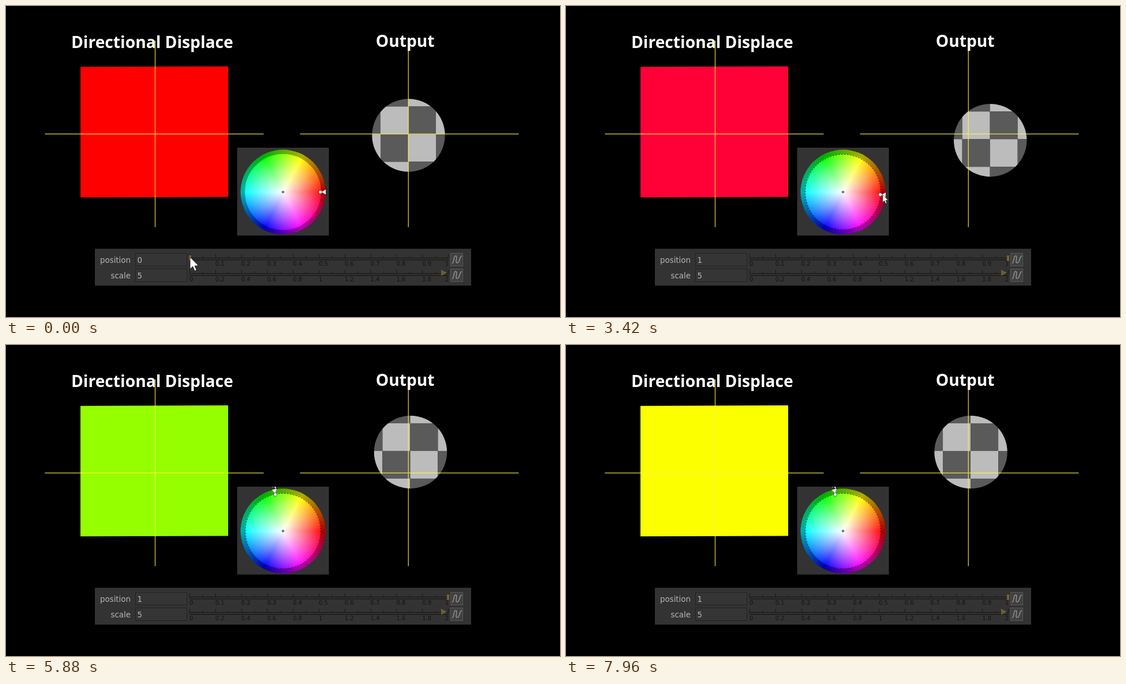
An HTML page with a canvas that plays this animation: 960x540 px, repeating every 8000 ms.

```html
<!DOCTYPE html>
<html lang="en">
<head>
<meta charset="utf-8">
<title>Directional Displace</title>
<style>
html, body { margin: 0; width: 100%; height: 100%; overflow: hidden; background: #000; }
canvas { display: block; }
</style>
</head>
<body>
<canvas id="stage" width="960" height="540"></canvas>
<script>
const ctx = document.getElementById('stage').getContext('2d');
const LOOP = 8000, DRAG_START = 2960, TAU = Math.PI * 2, RAD = Math.PI / 180;
const MAX_REACH = 38.7;
const wheel = { x: 480, y: 323, r: 73.5, inner: 66 };
const wheelPanel = [400.5, 246, 159, 152.5];
const sliderPanel = [154, 421.5, 652, 64];

// Poses of the wheel drag: time, handle angle, displacement angle (counter-clockwise degrees).
const drag = [
  { at: DRAG_START, dial: 0, push: 0 },
  { at: 3420, dial: -4, push: -13 },
  { at: 4250, dial: -63, push: -60 },
  { at: 5000, dial: -124, push: -118 },
  { at: 5880, dial: -258, push: -275 },
  { at: 6710, dial: -350, push: -333 },
  { at: 6990, dial: -395, push: -395 },
  { at: 7960, dial: -258, push: -276 },
];

const ramp = (t, from, to) => Math.min(1, Math.max(0, (t - from) / (to - from)));

// Smooth interpolation between poses that never overshoots and rests at both ends.
function pose(key, t) {
  const last = drag.length - 1;
  if (t <= drag[0].at) return drag[0][key];
  if (t >= drag[last].at) return drag[last][key];
  const grade = i => (drag[i + 1][key] - drag[i][key]) / (drag[i + 1].at - drag[i].at);
  const slope = i => {
    if (i === 0 || i === last) return 0;
    const a = grade(i - 1), b = grade(i);
    return a * b <= 0 ? 0 : 2 * a * b / (a + b);
  };
  const i = drag.findIndex(p => p.at > t) - 1;
  const span = drag[i + 1].at - drag[i].at, u = (t - drag[i].at) / span, w = 1 - u;
  return w * w * (1 + 2 * u) * drag[i][key] + u * u * (3 - 2 * u) * drag[i + 1][key] +
    span * u * w * (w * slope(i) - u * slope(i + 1));
}

function polar(radius, degrees) {
  return [radius * Math.cos(degrees * RAD), -radius * Math.sin(degrees * RAD)];
}

function polygon(points, fill) {
  ctx.beginPath();
  points.forEach(([x, y]) => ctx.lineTo(x, y));
  ctx.closePath();
  ctx.fillStyle = fill;
  ctx.fill();
}

function disc(x, y, r) {
  ctx.beginPath();
  ctx.arc(x, y, r, 0, TAU);
}

function box(x, y, w, h, fill) {
  ctx.fillStyle = fill;
  ctx.fillRect(x, y, w, h);
}

function stroke(color, width) {
  ctx.strokeStyle = color;
  ctx.lineWidth = width;
  ctx.stroke();
}

function label(text, x, y, font, color, align = 'left') {
  ctx.font = font;
  ctx.fillStyle = color;
  ctx.textAlign = align;
  ctx.fillText(text, x, y);
}

function drawPointer(panel, x, y, scale) {
  ctx.save();
  ctx.beginPath();
  ctx.rect(...panel);
  ctx.clip();
  ctx.translate(x, y);
  ctx.scale(scale, scale);
  polygon([[0, 0], [0, 16.2], [3.7, 12.8], [6.3, 18.8], [8.8, 17.7], [6.3, 12], [11.3, 11.6]], '#fff');
  stroke('#111', 0.6);
  ctx.restore();
}

function drawBall(dx, dy) {
  const cell = 48;
  ctx.save();
  ctx.translate(697 + dx, 222.5 + dy);
  disc(0.5, 2, 63.2);
  ctx.clip();
  for (let i = -2; i < 2; i++)
    for (let j = -2; j < 2; j++)
      box(i * cell, j * cell, cell, cell, (i + j) % 2 ? '#5a5a5a' : '#bcbcbc');
  ctx.restore();
}

function drawAxes(left, x) {
  ctx.beginPath();
  ctx.moveTo(left, 222.3);
  ctx.lineTo(left + 379, 222.3);
  ctx.moveTo(x, 60);
  ctx.lineTo(x, 384);
  stroke('rgba(255,242,75,0.75)', 1.5);
}

function drawWheel(t) {
  const { x, y, r, inner } = wheel;
  box(...wheelPanel, '#333');

  const hues = ctx.createConicGradient(0, x, y);
  [[0, '#f00'], [62, '#ff0'], [118, '#0f0'], [180, '#0ff'], [243, '#00f'], [297, '#f0f'], [360, '#f00']]
    .forEach(([angle, color]) => hues.addColorStop(1 - angle / 360, color));
  disc(x, y, r);
  ctx.fillStyle = hues;
  ctx.fill();

  const glow = ctx.createRadialGradient(x, y, 0, x, y, inner);
  glow.addColorStop(0, '#fff');
  glow.addColorStop(1, 'rgba(255,255,255,0.05)');
  disc(x, y, inner);
  ctx.fillStyle = glow;
  ctx.fill();

  disc(x, y, (r + inner) / 2);
  stroke('rgba(0,0,0,0.32)', r - inner);

  ctx.beginPath();
  ctx.moveTo(x - 2.5, y);
  ctx.lineTo(x + 2.5, y);
  ctx.moveTo(x, y - 2.5);
  ctx.lineTo(x, y + 2.5);
  stroke('#111', 1);

  if (t >= DRAG_START) {
    disc(x, y, 65.5);
    ctx.setLineDash([3, 2]);
    stroke('rgba(0,0,0,0.75)', 1);
    ctx.setLineDash([]);
  }

  const angle = pose('dial', t);
  ctx.save();
  ctx.translate(x, y);
  ctx.rotate(-angle * RAD);
  polygon([[67, 0], [74, -4.2], [74, 4.2]], '#fff');
  disc(64.8, 0, 3);
  ctx.fill();
  stroke('#333', 0.7);
  ctx.restore();

  if (t < 2540) return;
  const away = 1 - ramp(t, 2540, 2790);
  const [px, py] = polar(69 + 21 * ramp(t, 5000, 5880), angle);
  drawPointer(wheelPanel, x + px + 12 * away, y + py + 22 * away, 0.8);
}

function drawCurveButton(y) {
  box(770, y, 22, 23, '#595959');
  box(771, y + 1, 20, 21, '#404040');
  ctx.beginPath();
  ctx.moveTo(773, y + 18);
  ctx.bezierCurveTo(777, y + 17, 775, y + 5, 779, y + 5);
  ctx.bezierCurveTo(784, y + 5, 777, y + 17, 782, y + 17);
  ctx.bezierCurveTo(787, y + 17, 785, y + 6, 790, y + 5);
  stroke('#858585', 1.8);
}

function drawRow(y, name, value, step) {
  const font = '13.4px "DejaVu Sans", sans-serif';
  label(name, 216, y + 17, font, '#b5b5b5', 'right');
  box(224, y, 90, 23, '#232323');
  box(225, y + 1, 88, 21, '#353535');
  label(value, 227.5, y + 17, font, '#b5b5b5');

  for (let i = 0; i <= 20; i++) {
    const h = i % 2 ? 3 : 6;
    box(318 + i * 22.4, y + 8 - h, 1, h, '#191919');
  }
  box(318, y + 8, 449, 4.2, '#111');
  box(318, y + 9.2, 449, 1.8, '#3c3b34');
  for (let i = 0; i <= 10; i++) {
    const end = i === 10;
    label(String(+(i * step).toFixed(1)), end ? 767 : 318 + i * 44.8, y + 22,
      '10px "DejaVu Sans", sans-serif', '#141414', end ? 'right' : 'left');
  }
  drawCurveButton(y);
}

function drawSliders(t, position) {
  box(...sliderPanel, '#333');
  drawRow(429, 'position', String(+position.toFixed(3)), 0.1);
  drawRow(456, 'scale', '5', 0.2);

  const x = 319 + position * 447;
  box(x - 3, 432, 6, 11.5, '#2b2515');
  box(x - 2.2, 432.8, 4.4, 10, '#756232');
  polygon([[754, 458], [764, 463.3], [754, 468.5]], '#696034');

  drawPointer(sliderPanel, 319 + 452 * position,
    436 + 9 * position + 45 * ramp(t, 1830, 2080), 1.27);
}

function draw(t) {
  const position = 1 - (1 - ramp(t, 40, 1500)) ** 1.66;
  const reach = MAX_REACH * (1 - (1 - position) ** 1.4);
  const push = pose('push', t);
  const hue = push - 23 * ramp(t, 7460, 7960); // the colour trails on the way back

  box(0, 0, 960, 540, '#000');
  polygon([[129, 105.7], [385, 104.7], [385, 331.5], [129, 332.2]],
    `hsl(${(hue + 720) % 360}, 100%, 50%)`);
  drawBall(...polar(reach, push));
  drawAxes(67.5, 258.5);
  drawAxes(509.5, 697.3);

  const title = 'bold 28.2px "Open Sans", "Noto Sans", sans-serif';
  label('Directional Displace', 113, 73, title, '#fff');
  label('Output', 640.8, 71, title, '#fff');

  drawWheel(t);
  drawSliders(t, position);
}

function frame() {
  draw(performance.now() % LOOP);
  requestAnimationFrame(frame);
}
frame();
</script>
</body>
</html>
```
